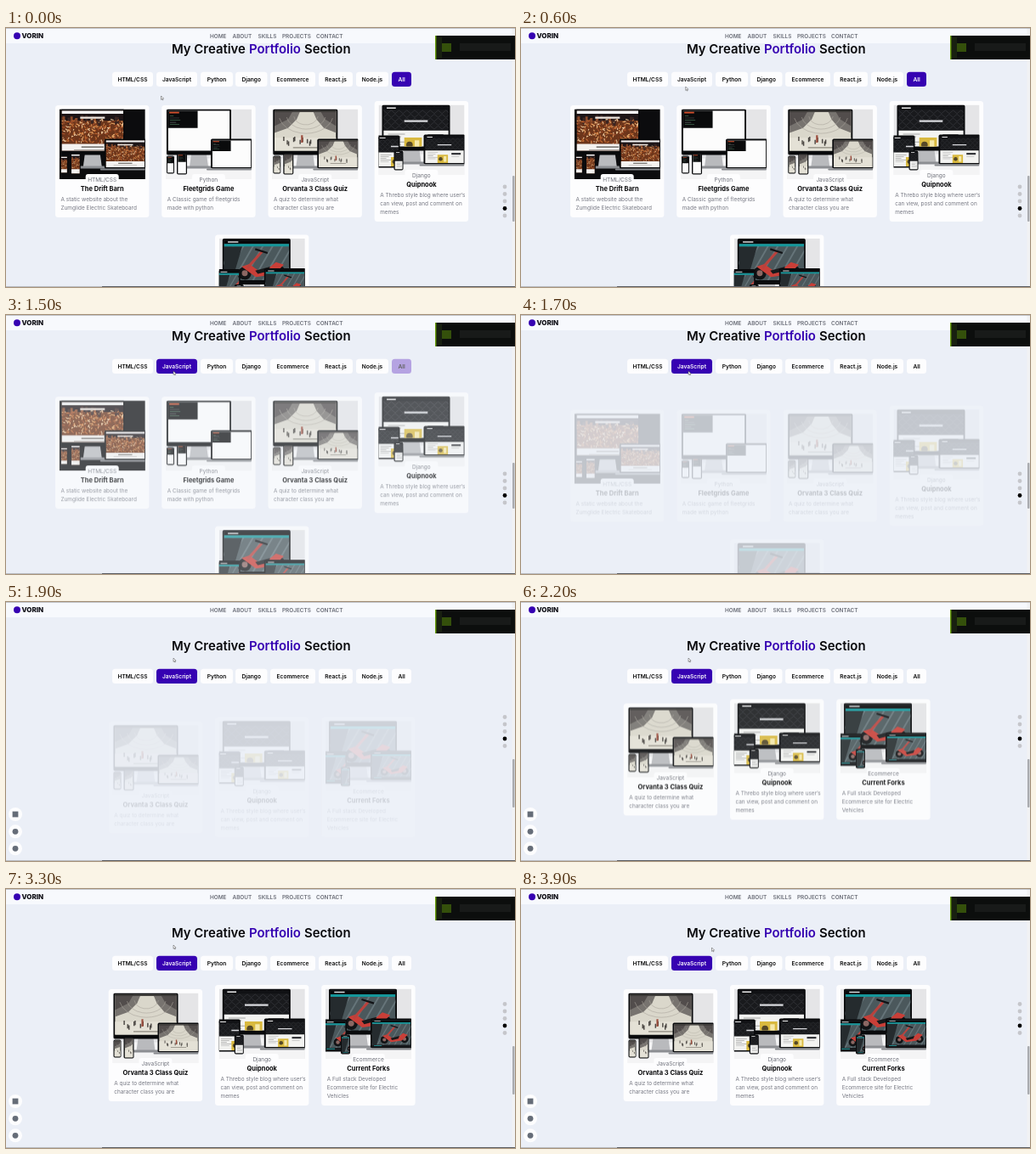
An HTML page with a canvas that plays this animation: 599 px wide and 305 px high, repeating every 4000 ms.

```html
<!DOCTYPE html>
<html lang="en">
<head>
<meta charset="utf-8">
<title>Portfolio section</title>
<style>
  html, body { margin: 0; width: 100%; height: 100%; overflow: hidden; background: #ebeff7; }
  canvas { display: block; width: 599px; height: 305px; }
</style>
</head>
<body>
<canvas id="stage" width="599" height="305"></canvas>
<script>
const W = 599, H = 305, LOOP = 4000;
const PURPLE = '#3602b2', WHITE = '#fdfdfe', PAGE = '#ebeff7';
const EXIT = 1360, SWAP = 1770, FADE = 500, DROP = 27;
const stage = document.getElementById('stage').getContext('2d');

const clamp = v => Math.max(0, Math.min(1, v));
const progress = (t, from, span) => clamp((t - from) / span);
const mix = (a, b, k) => a + (b - a) * k;
const ease = k => k * k * (3 - 2 * k);

function seeded(seed) {
  return () => (seed = (seed * 16807) % 2147483647) / 2147483647;
}

function box(c, x, y, w, h, fill, r = 0) {
  c.fillStyle = fill;
  c.beginPath();
  c.roundRect(x, y, w, h, r);
  c.fill();
}

function disc(c, x, y, r, fill) {
  c.fillStyle = fill;
  c.beginPath();
  c.arc(x, y, r, 0, 7);
  c.fill();
}

function poly(c, fill, ...points) {
  c.fillStyle = fill;
  c.beginPath();
  points.forEach(([x, y]) => c.lineTo(x, y));
  c.closePath();
  c.fill();
}

function stroke(c, color, width, ...points) {
  c.strokeStyle = color;
  c.lineWidth = width;
  c.beginPath();
  points.forEach(([x, y]) => c.lineTo(x, y));
  c.stroke();
}

// y is the vertical middle of the capitals
function text(c, s, x, y, size, weight, fill, align = 'left') {
  c.font = `${weight} ${size}px Inter, sans-serif`;
  c.textAlign = align;
  c.fillStyle = fill;
  c.fillText(s, x, y + size * 0.36);
}

// Each scene paints a 100 x 70 screen.
const scenes = {
  leaves(c) {
    const rnd = seeded(11);
    const tones = ['#c96f33', '#e3a263', '#7d3a1b', '#a8512a', '#edc79a'];
    box(c, 0, 0, 100, 70, '#6b351b');
    box(c, 0, 0, 100, 16, '#1d1517');
    for (let i = 0; i < 18; i++) box(c, rnd() * 100, 7 + rnd() * 7, 4, 12, i % 3 ? '#3a2522' : '#8a4a2a');
    for (let i = 0; i < 300; i++) {
      c.save();
      c.translate(rnd() * 100, 15 + rnd() * 38);
      c.rotate(rnd() * 6);
      box(c, 0, 0, 1.5 + rnd() * 4, 1.5, tones[i % 5]);
      c.restore();
    }
    box(c, 0, 0, 100, 5, '#f2f2f2');
    box(c, 30, 10, 40, 3, '#eee6df');
    box(c, 0, 54, 100, 16, '#f4f2f0');
    box(c, 32, 58, 36, 2, '#55504d');
    box(c, 20, 63, 60, 1.2, '#aaa6a2');
  },
  terminal(c) {
    const rnd = seeded(5);
    box(c, 0, 0, 100, 70, '#fcfcfc');
    box(c, 0, 0, 48, 28, '#0a0b0c');
    for (let i = 0; i < 5; i++) box(c, 3, 8 + i * 3.5, 6 + rnd() * 14, 1, i % 2 ? '#596060' : '#41684f');
    box(c, 2, 2, 16, 2.4, '#d9532f');
  },
  sketch(c) {
    const rnd = seeded(23);
    box(c, 0, 0, 100, 70, '#dad7cb');
    poly(c, '#77736f', [0, 0], [42, 0], [36, 14], [22, 28], [0, 36]);
    poly(c, '#524d4c', [0, 0], [30, 0], [22, 14], [0, 25]);
    poly(c, '#77736f', [62, 0], [100, 0], [100, 36], [80, 28], [68, 14]);
    poly(c, '#524d4c', [74, 0], [100, 0], [100, 25], [82, 14]);
    for (let i = 0; i < 3; i++) {
      c.strokeStyle = '#aaa69c';
      c.lineWidth = 0.8;
      c.beginPath();
      c.ellipse(51, 6, 20 + i * 12, 17 + i * 7, 0, 0.2, 2.94);
      c.stroke();
    }
    box(c, 0, 44, 100, 26, '#e4e1d6');
    for (let i = 0; i < 12; i++) box(c, 14 + rnd() * 70, 42 + rnd() * 10, 2, 7, '#4b4743');
    box(c, 43, 40, 3, 12, '#9c4c3c');
    box(c, 30, 59, 40, 2, '#8b877c');
    box(c, 0, 0, 100, 2.5, '#33312f');
  },
  leather(c) {
    box(c, 0, 0, 100, 70, '#191a1d');
    for (let row = 0; row < 6; row++)
      for (let i = -1; i < 10; i++) {
        const x = i * 12 + (row % 2) * 6, y = row * 6;
        stroke(c, '#303236', 1.2, [x, y + 5], [x + 6, y], [x + 12, y + 5]);
      }
    box(c, 0, 0, 100, 5, '#101114');
    box(c, 5, 1.5, 14, 2, '#ececec');
    box(c, 32, 21, 36, 3, '#d9dade');
    box(c, 0, 37, 100, 33, '#f3f3f1');
    for (let i = 0; i < 5; i++) box(c, 7, 42 + i * 4, 26 - i % 3 * 6, 1.3, '#a5a5a5');
    box(c, 32, 48, 27, 22, '#d9b93f');
    disc(c, 40, 59, 5, '#554827');
    box(c, 48, 52, 7, 14, '#f5e8a9');
    box(c, 68, 43, 24, 5, '#35363a');
    box(c, 68, 52, 20, 1.3, '#a5a5a5');
  },
  scooter(c) {
    box(c, 0, 0, 100, 70, '#4b585c');
    for (let i = 0; i < 9; i++) stroke(c, '#66757a', 2.5, [i * 15 - 20, 70], [i * 15 + 15, 9]);
    poly(c, '#252b2e', [0, 10], [28, 10], [12, 64], [0, 64]);
    box(c, 0, 0, 100, 6, '#08090b');
    box(c, 0, 6, 100, 4, '#15969a');
    box(c, 6, 2, 16, 2, '#d8dbdd');
    for (const [x, y] of [[32, 51], [84, 49]]) {
      disc(c, x, y, 10, '#111315');
      disc(c, x, y, 4.5, '#8a6763');
    }
    poly(c, '#c93f38', [27, 41], [39, 37], [53, 47], [70, 42], [80, 34], [92, 38], [77, 53], [49, 57]);
    poly(c, '#17191b', [48, 47], [71, 41], [68, 48], [52, 52]);
    stroke(c, '#b9423d', 4, [36, 43], [59, 17]);
    stroke(c, '#111316', 3, [48, 14], [67, 20]);
    box(c, 0, 64, 100, 6, '#17191c');
    box(c, 5, 65.5, 20, 2, '#23a6a8');
  }
};

function screen(c, scene, x, y, w, h, rim = 1.7, chin = rim) {
  const innerW = w - 2 * rim, innerH = h - rim - chin;
  box(c, x, y, w, h, '#090a0c', 1.8);
  c.save();
  c.beginPath();
  c.rect(x + rim, y + rim, innerW, innerH);
  c.clip();
  c.translate(x + rim, y + rim);
  // Screens crop the scene rather than squash it.
  const k = Math.max(innerW / 100, innerH / 70);
  c.scale(k, k);
  scenes[scene](c);
  c.restore();
}

function mockup(c, { scene, wide, wall = '#e5e5e7', floor = '#f4f4f5' }, x, y) {
  c.save();
  c.beginPath();
  c.rect(x, y, 101, 82.5);
  c.clip();
  c.translate(x, y);
  box(c, 0, 0, 101, 83, wall);
  box(c, 0, 58, 101, 25, floor);
  poly(c, '#b9babd', [30, 53], [48, 53], [50, 68], [28, 68]);
  box(c, 24, 67, 30, 3, '#8c8e92', 1);
  screen(c, scene, wide ? 4 : 1, 0, wide ? 80 : 76, 54, 1.7, 5);
  screen(c, scene, 53, 35, 49, 35);
  box(c, 48, 70, 53, 2, '#85878b', 1);
  if (wide) {
    screen(c, scene, -3, 36, 28, 38);
    screen(c, scene, 18, 54, 11, 23, 1);
  } else {
    screen(c, scene, 13, 52, 12, 25, 1.2);
    screen(c, scene, 1, 55, 9, 21, 1);
  }
  c.restore();
}

const projects = {
  board: { scene: 'leaves', wall: '#0c0c0e', floor: '#0c0c0e', tag: 'HTML/CSS', title: 'The Drift Barn',
    lines: ['A static website about the', 'Zumglide Electric Skateboard'] },
  fleet: { scene: 'terminal', tag: 'Python', title: 'Fleetgrids Game',
    lines: ['A Classic game of fleetgrids', 'made with python'] },
  quiz: { scene: 'sketch', tag: 'JavaScript', title: 'Orvanta 3 Class Quiz',
    lines: ['A quiz to determine what', 'character class you are'] },
  blog: { scene: 'leather', wide: true, tag: 'Django', title: 'Quipnook',
    lines: ['A Threbo style blog where user\u2019s', 'can view, post and comment on', 'memes'] },
  shop: { scene: 'scooter', wide: true, tag: 'Ecommerce', title: 'Current Forks',
    lines: ['A Full stack Developed', 'Ecommerce site for Electric', 'Vehicles'] }
};

function card(c, project, x, y) {
  const mid = x + 55.2;
  box(c, x, y, 110.4, 112 + 10 * project.lines.length, WHITE, 3.5);
  mockup(c, project, x + 4.8, y + 4.6);
  box(c, mid - 19.5, y + 81, 39, 12, WHITE, 3);
  text(c, project.tag, mid, y + 87.7, 6.5, 400, '#6e7079', 'center');
  text(c, project.title, mid, y + 98, 7.5, 700, '#08080a', 'center');
  project.lines.forEach((line, i) =>
    text(c, line, x + 6.5, y + 110.3 + i * 10.1, 6.45, 400, '#777983'));
}

function layer(items) {
  const canvas = document.createElement('canvas');
  canvas.width = W;
  canvas.height = 420;
  const c = canvas.getContext('2d');
  items.forEach(([name, x, y]) => card(c, projects[name], x, y));
  return canvas;
}

const allCards = layer([['board', 58, 91], ['fleet', 183.2, 91], ['quiz', 308.5, 91],
  ['blog', 433.7, 86], ['shop', 246, 243.4]]);
const scriptCards = layer([['quiz', 120.7, 118], ['blog', 246, 113], ['shop', 371.2, 113]]);

const filters = [['HTML/CSS', 125, 48], ['JavaScript', 177, 48], ['Python', 229, 38],
  ['Django', 270, 37.5], ['Ecommerce', 311, 53], ['React.js', 368, 40],
  ['Node.js', 412, 38], ['All', 454, 23]];
const menu = [['HOME', 240], ['ABOUT', 266.5], ['SKILLS', 296.5], ['PROJECTS', 325], ['CONTACT', 365]];

function drawCards(t) {
  const entering = t >= SWAP;
  const k = ease(progress(t, entering ? SWAP : EXIT, FADE));
  const away = entering ? 1 - k : k;
  stage.globalAlpha = 1 - away ** 0.75;
  stage.drawImage(entering ? scriptCards : allCards, 0, away * DROP);
  stage.globalAlpha = 1;
}

function drawFilters(t, top) {
  const active = {
    JavaScript: progress(t, 600, 250),
    All: 1 - progress(t, EXIT, 220)
  };
  for (const [label, x, w] of filters) {
    const on = active[label] || 0, shade = Math.round(mix(10, 255, on));
    box(stage, x, top, w, 17.3, WHITE, 3.5);
    stage.globalAlpha = on;
    box(stage, x, top, w, 17.3, PURPLE, 3.5);
    stage.globalAlpha = 1;
    text(stage, label, x + w / 2, top + 8.5, 6.6, 600, `rgb(${shade},${shade},${shade})`, 'center');
  }
}

function drawHeading(y) {
  text(stage, 'My Creative', 195, y, 14.9, 600, '#08080b');
  text(stage, 'Portfolio', 286, y, 14.9, 600, PURPLE);
  text(stage, 'Section', 351, y, 14.9, 600, '#08080b');
}

function drawHeader() {
  box(stage, 0, 0, W, 18, '#f7f9fd');
  disc(stage, 13, 9.3, 4, PURPLE);
  text(stage, 'VORIN', 18.5, 9.3, 8, 800, '#0b0b12');
  menu.forEach(([label, x]) => text(stage, label, x, 9.2, 6.4, 600, '#6a6d77'));
}

function drawOverlay() {
  box(stage, 505, 9, 94, 28, '#0c0e0d');
  box(stage, 505, 9, 1.5, 28, '#669b0c');
  box(stage, 507, 11, 6, 24, '#182010');
  box(stage, 513, 18, 11, 10, '#34500b');
  box(stage, 534, 18, 60, 9, '#181a19');
}

function drawEdges(scrolled) {
  box(stage, 595.5, 0, 3.5, H, '#f1f2f4');
  box(stage, 596, scrolled ? 185 : 174, 2.5, scrolled ? 57 : 54, '#a9abb0', 1);
  const top = scrolled ? 135.5 : 187;
  for (let i = 0; i < 5; i++) disc(stage, 587, top + i * 8.5, 2.4, i === 3 ? '#000' : '#c5c6cb');
  if (scrolled) {
    [250, 270.3, 290.3].forEach((y, i) => {
      disc(stage, 11, y, 8, WHITE);
      if (i) disc(stage, 11, y, 3.4, '#666d78');
      else box(stage, 7.6, y - 3.4, 6.8, 6.8, '#666d78');
    });
  }
  box(stage, 0, 0, W, 0.6, '#8d9096');
  box(stage, 0, 304, 113, 1, '#b9bcc2');
  box(stage, 113, 304, W - 113, 1, '#5b5e64');
}

function drawCursor(t) {
  const up = ease(progress(t, 150, 650)), right = ease(progress(t, 3500, 400));
  const x = mix(mix(182.5, 197, up), 224.5, right);
  const y = mix(mix(80, 66, up), 69, right);
  stage.save();
  stage.translate(x, y);
  stage.lineJoin = 'round';
  poly(stage, '#fff', [0, 0], [0, 4.4], [1.1, 3.5], [1.8, 5], [2.4, 4.7], [1.8, 3.2], [3.1, 3.1]);
  stage.strokeStyle = '#444';
  stage.lineWidth = 0.5;
  stage.stroke();
  stage.restore();
}

function draw() {
  const t = performance.now() % LOOP, scrolled = t >= SWAP;
  const shift = scrolled ? 27 : 0;
  box(stage, 0, 0, W, H, PAGE);
  drawHeading(25 + shift);
  drawCards(t);
  drawFilters(t, 51.8 + shift);
  drawHeader();
  drawEdges(scrolled);
  drawOverlay();
  drawCursor(t);
  requestAnimationFrame(draw);
}
draw();
</script>
</body>
</html>
```
